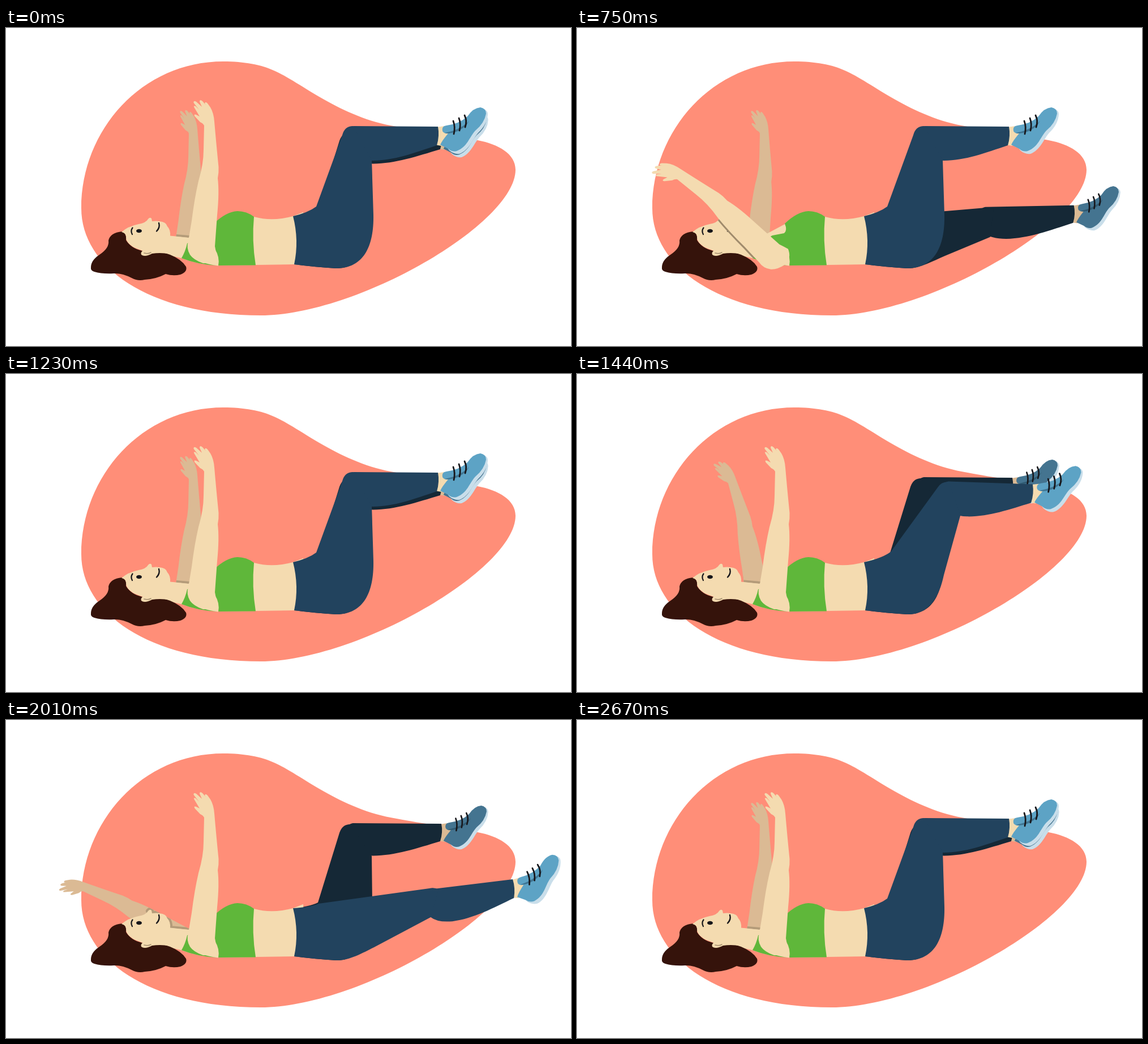
Write an HTML page with a canvas that moves like this. It is 998 by 561 pixels and loops after 2700 ms.

```html
<!DOCTYPE html>
<html lang="en">
<head>
<meta charset="utf-8">
<title>Dead bug exercise</title>
<style>
html, body { margin: 0; width: 100%; height: 100%; overflow: hidden; background: #fff; }
canvas { display: block; width: 998px; height: 561px; }
</style>
</head>
<body>
<canvas id="stage" width="998" height="561"></canvas>
<script>
const LOOP = 2700;
const ctx = document.getElementById('stage').getContext('2d');
const P = d => new Path2D(d);

const SKIN = '#f4dbb0', SKIN_FAR = '#dbba94', SHADE = '#b49b79', INK = '#17161a';
const HAIR = '#35130b', GREEN = '#5fb73a', SOLE = '#c9deea';

const blob = P('M384 59C420 59 452 65 473 75C520 95 590 158 690 174C730 182 800 191 833 198C870 205 900 222 900 250C900 345 620 507 450 507C250 507 133 420 133 318C133 180 240 59 384 59Z');

const torso = P('M285 366L322 370L369 345L410 330L438 333Q470 342 507 332L525 325L530 418L509 417L441 418L375 419Q338 417 310 406L270 397Z');
const top_ = P('M438 333Q425 323 409 323Q389 324 367 345Q372 357 366 362L345 366L320 380Q317 394 310 406Q340 418 375 419L441 418.5Q434 375 438 333Z');
const shoulder = P('M328 402Q340 415 375 419.5Q378 404 369 390L340 385Z');

const hair = P('M150 422Q150 410 165 400Q183 388 181 375Q184 361 205 359Q214 362 212 374Q220 388 240 393L258 397Q275 394 290 400Q310 408 318 421Q321 430 308 435Q295 438 282 434Q265 443 245 444Q233 447 222 441Q205 432 190 433Q170 434 156 430Q149 428 150 422Z');
const face = P('M204 360Q215 350 234 346Q247 344 251 337Q254 333 257 336L258 341Q265 340 271 341Q283 342 285 350Q291 356 290 367L322 370L313 406Q285 394 258 398Q240 393 226 387Q211 378 212 368Q211 361 204 360Z');
const profile = P('M251 337Q254 333 257 336L258 341Q265 340 271 341Q283 342 285 350Q291 356 290 367L324 370');
const ear = P('M243 391Q237 396 239 400Q245 405 258 398L254 390Z');
const earLine = P('M244 397Q251 399 256 396');
const brow = P('M223.500 352.500Q219.500 358 223 364');
const smile = P('M270 344Q272.500 352 266 358.500');

const arm = P('M350 172Q348 168 343 166L333.500 156Q331 151 336 153L342 156L333 141Q330 136 335 138L341 144L331.500 132Q331 127 336 130L346 139L342 130Q342 125 347 129L353 136L351 133Q352 129 356 133L361 140Q367 150 368 165Q371 200 375.500 245Q376 255 374 265Q377 290 373 330L369 385Q371 395 372 402Q364 416 348 415Q331 409 325 400Q318 388 322 376L328 340Q333 300 340 270Q349 240 349 215Z');

const shin = P('M763 174L614 173Q603 175 603 192L611 222Q622 233 648 234C685 234 722 220 761 207Q766 190 763 174Z');
const ankle = P('M760 175L774 173L784 187L769 208L758 206Z');
const sole = P('M843 143Q851 145 851 152Q850 170 834 185C825 195 818 216 801 222Q791 223 783 216L775 205Z');
const upper = P('M771 182Q769 173 778 172Q801 169 815 156Q825 141 838 140Q848 142 848 151Q845 168 829 181C818 193 815 210 796 217Q788 219 781 213L767 206Q770 199 781 186Q774 187 771 182Z');
const tongue = P('M775 185Q802 180 818 164Q806 184 781 186Z');
const laces = P('M790 164Q794 175 791 187M800 159Q804 169 801 181M810 154Q815 164 811 175');

// Poses at the given amounts of extension: crotch, knee cap (3), knee back,
// hamstring and its two curve handles; cuff is x, y and turn in degrees.
const nearLeg = {
  keys: [.25, 1], pants: '#22435e', skin: SKIN, shoe: '#5da3c5', dark: '#3f7593',
  shinScale: [1, 1], shoeScale: 1,
  poses: [
    [548,315, 594,189, 598,173, 613,173, 646,233, 649,330, 650,385, 632,424],
    [555,313, 638,201, 645,190, 658,191, 678,250, 648,355, 640,392, 622,425],
    [552,324, 748,297, 757,295, 764,299, 750,348, 650,401, 630,411, 605,425]
  ],
  cuff: [[763,174,0], [806,195,1.5], [895,281,-7.3]]
};
const farLeg = {
  keys: [.192, .963], pants: '#152836', skin: SKIN_FAR, shoe: '#447490', dark: '#305a72',
  shinScale: [1.05, .94], shoeScale: .94,
  poses: [
    [551,322, 589,199, 594,184, 608,184, 646,240, 647,325, 648,383, 631,424],
    [555,320, 625,208, 632,196, 645,198, 670,257, 649,352, 641,392, 622,425],
    [560,330, 718,313, 725,312, 735,312, 729,365, 650,402, 628,411, 605,425]
  ],
  cuff: [[769,183,0], [803,208,2.5], [877,310,-1]]
};

function fill(path, color) {
  ctx.fillStyle = color;
  ctx.fill(path);
}

function line(path, color, width) {
  ctx.strokeStyle = color;
  ctx.lineWidth = width;
  ctx.stroke(path);
}

function scoped(draw) {
  ctx.save();
  draw();
  ctx.restore();
}

// Smooth curve through three poses at 0, a and b.
function blend(u, [a, b], [p, q, r]) {
  const wp = (u - a) * (u - b) / (a * b);
  const wq = u * (u - b) / (a * (a - b));
  const wr = u * (u - a) / (b * (b - a));
  return p.map((v, i) => v * wp + q[i] * wq + r[i] * wr);
}

function ramp(t, from, to) {
  const p = Math.min(1, Math.max(0, (t - from) / (to - from)));
  return (1 - Math.cos(Math.PI * p)) / 2;
}

function thighPath(v) {
  const path = new Path2D();
  path.moveTo(507, 332);
  path.quadraticCurveTo(v[0] - 14, (332 + v[1]) / 2 + 2, v[0], v[1]);
  path.lineTo(v[2], v[3]);
  path.quadraticCurveTo(v[4], v[5], v[6], v[7]);
  path.lineTo(v[8], v[9]);
  path.lineTo(v[10], v[11]);
  path.bezierCurveTo(v[12], v[13], v[14], v[15], 583, 424);
  path.quadraticCurveTo(548, 422, 509, 417);
  path.quadraticCurveTo(518, 375, 507, 332);
  return path;
}

function drawShoe(leg) {
  fill(ankle, leg.skin);
  fill(sole, SOLE);
  fill(upper, leg.shoe);
  fill(tongue, leg.dark);
  line(laces, INK, 2.8);
}

function drawLeg(leg, u) {
  const [x, y, turn] = blend(u, leg.keys, leg.cuff);
  const at = (sx, sy, draw) => scoped(() => {
    ctx.translate(x, y);
    ctx.rotate(turn * Math.PI / 180);
    ctx.scale(sx, sy);
    ctx.translate(-763, -174);
    draw();
  });
  at(leg.shoeScale, leg.shoeScale, () => drawShoe(leg));
  at(...leg.shinScale, () => fill(shin, leg.pants));
  fill(thighPath(blend(u, leg.keys, leg.poses)), leg.pants);
}

function turned(path, x, y, degrees, base = new DOMMatrix()) {
  const m = new DOMMatrix().translate(x, y).rotate(degrees).translate(-x, -y).multiply(base);
  const out = new Path2D();
  out.addPath(path, m);
  return out;
}

function drawFarArm(u) {
  const shape = turned(arm, 319, 388, -66 * u, new DOMMatrix([.84, 0, 0, .92, 29, 27.6]));
  fill(shape, SKIN_FAR);
  scoped(() => {
    ctx.clip(shape);
    line(profile, SHADE, 8);
  });
}

function drawNearArm(u) {
  const shape = turned(arm, 360, 395, -53.3 * u);
  if (u > 0) scoped(() => {
    ctx.clip(face);
    ctx.translate(-2 * u, 2.5 * u);
    fill(shape, '#a08b6c');
  });
  fill(shoulder, SKIN);
  fill(shape, SKIN);
}

function drawHead() {
  fill(hair, HAIR);
  fill(face, SKIN);
  fill(ear, SKIN);
  line(earLine, '#a58f70', 1.5);
  line(brow, INK, 2.2);
  line(smile, INK, 2.4);
  ctx.fillStyle = INK;
  ctx.beginPath();
  ctx.ellipse(235, 358, 5, 3.2, 0, 0, Math.PI * 2);
  ctx.fill();
}

function draw(t) {
  const first = ramp(t, 0, 308) - ramp(t, 724, 1056);
  const second = ramp(t, 1332, 1664) - ramp(t, 2086, 2420);
  ctx.fillStyle = '#fff';
  ctx.fillRect(0, 0, 998, 561);
  fill(blob, '#ff8e78');
  drawFarArm(second);
  drawLeg(farLeg, first);
  fill(torso, SKIN);
  drawHead();
  fill(top_, GREEN);
  drawLeg(nearLeg, second);
  drawNearArm(first);
}

function tick() {
  draw(performance.now() % LOOP);
  requestAnimationFrame(tick);
}

ctx.lineCap = 'round';
ctx.lineJoin = 'round';
tick();
</script>
</body>
</html>
```
